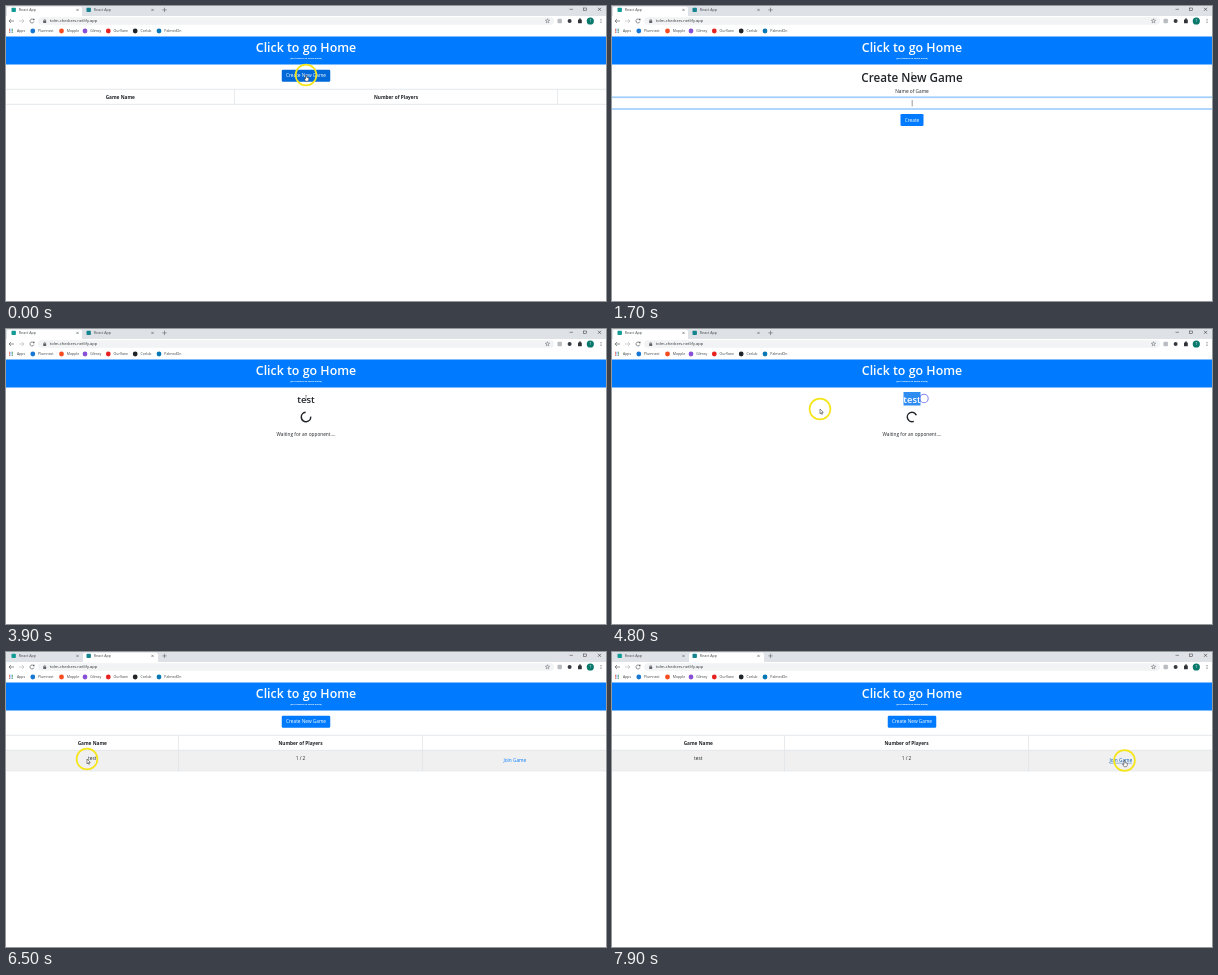
Write an HTML page with a canvas that moves like this. It is 600 px wide and 295 px high and loops after 8 s.

```html
<!DOCTYPE html>
<html lang="en">
<head>
<meta charset="utf-8">
<title>Checkers lobby</title>
<style>
  html, body { margin: 0; width: 100%; height: 100%; overflow: hidden; background: #fff; }
  canvas { display: block; width: 600px; height: 295px; }
</style>
</head>
<body>
<canvas id="stage"></canvas>
<script>
const W = 600, H = 295, LOOP = 8000;
const canvas = document.getElementById('stage');
const ctx = canvas.getContext('2d');
const dpr = window.devicePixelRatio || 1;
canvas.width = W * dpr;
canvas.height = H * dpr;

const BLUE = '#007bff', INK = '#212529', RULE = '#dee2e6', GREY = '#5f6368';
const BODY = 4.75;

// Moments at which the view changes
const FORM = 750, WAIT = 2600, SELECT = 4480, SWITCH = 5560;
const CLICKS = [[500, 300, 69], [4460, 312, 69.5], [5540, 92, 4.5]];
const PATH = [
  [0, 300, 69], [4300, 300, 69], [4440, 312, 69], [4540, 312, 69],
  [4800, 208, 80], [5150, 100, 10], [5350, 92, 5], [5600, 92, 5],
  [5900, 165, 28], [6150, 122, 78], [6500, 81, 107], [6900, 96, 108],
  [7200, 304, 112], [7700, 512, 110], [7900, 512.5, 108.5], [8000, 512.5, 108.5]
];

function rect(x, y, w, h, fill, r = 0) {
  ctx.fillStyle = fill;
  ctx.beginPath();
  ctx.roundRect(x, y, w, h, r);
  ctx.fill();
}

function disc(x, y, r, fill) {
  ctx.fillStyle = fill;
  ctx.beginPath();
  ctx.arc(x, y, r, 0, Math.PI * 2);
  ctx.fill();
}

function ring(x, y, r, color, width) {
  ctx.strokeStyle = color;
  ctx.lineWidth = width;
  ctx.beginPath();
  ctx.arc(x, y, r, 0, Math.PI * 2);
  ctx.stroke();
}

function line(points, color, width = 0.6) {
  ctx.strokeStyle = color;
  ctx.lineWidth = width;
  ctx.beginPath();
  points.forEach(([x, y]) => ctx.lineTo(x, y));
  ctx.stroke();
}

// y is the middle of the capitals
function text(str, x, y, size = BODY, color = INK, weight = 400, align = 'center') {
  ctx.font = `${weight} ${size}px "Open Sans", "Noto Sans", sans-serif`;
  ctx.textAlign = align;
  ctx.fillStyle = color;
  ctx.fillText(str, x, y + size * 0.357);
}

function cross(x, y, r, color) {
  line([[x - r, y - r], [x + r, y + r]], color);
  line([[x - r, y + r], [x + r, y - r]], color);
}

function pointerAt(t) {
  const i = PATH.findIndex((p, k) => k > 0 && t <= p[0]);
  const [t0, x0, y0] = PATH[i - 1], [t1, x1, y1] = PATH[i];
  const u = (t - t0) / (t1 - t0), e = u * u * (3 - 2 * u);
  return { x: x0 + (x1 - x0) * e, y: y0 + (y1 - y0) * e };
}

function drawTab(x, w, active) {
  if (active) rect(x, 0.8, w, 10, '#fff', [2, 2, 0, 0]);
  const left = x < 10 ? 5.5 : 80.5;
  rect(left, 1.7, 4.4, 4.4, x < 10 ? '#129b94' : '#16848f', 0.8);
  text('React App', left + 7.3, 3.9, 3.7, '#45494d', 400, 'left');
  cross(left + 66, 3.9, 1.1, GREY);
}

function drawBrowser(second) {
  rect(0, 0, W, 10, '#dee1e6');
  drawTab(1, 75, !second);
  drawTab(77, 75, second);
  line([[156.3, 3.9], [160.7, 3.9]], GREY);
  line([[158.5, 1.7], [158.5, 6.1]], GREY);
  line([[563.5, 3.3], [567, 3.3]], '#333', 0.5);
  ctx.strokeRect(577.6, 2, 2.7, 2.7);
  cross(593.5, 3.3, 1.5, '#333');

  rect(0, 10, W, 20.5, '#fff');
  line([[8, 15], [3, 15]], GREY, 0.7);
  line([[5, 13], [3, 15], [5, 17]], GREY, 0.7);
  line([[13, 15], [18, 15]], '#b9bcc0', 0.7);
  line([[16, 13], [18, 15], [16, 17]], '#b9bcc0', 0.7);
  ctx.strokeStyle = GREY;
  ctx.beginPath();
  ctx.arc(26, 15, 2, 0.3, 5.5);
  ctx.stroke();
  rect(27, 12.7, 1.5, 1.5, GREY);

  rect(32, 11.3, 516, 7.4, '#f1f3f4', 3.7);
  rect(37.2, 14.5, 3, 2.4, GREY, 0.3);
  ring(38.7, 14.3, 0.9, GREY, 0.5);
  text('tolm-checkers.netlify.app', 43.8, 15, 4.05, '#303438', 400, 'left');
  const star = Array.from({ length: 11 }, (_, i) => {
    const a = i * Math.PI / 5 - Math.PI / 2, r = i % 2 ? 1 : 2.3;
    return [541.5 + r * Math.cos(a), 15 + r * Math.sin(a)];
  });
  line(star, GREY, 0.5);
  rect(551.5, 12.8, 4.4, 4.4, '#b8bcc0', 0.8);
  disc(563.6, 15, 2, '#343a40');
  rect(572, 13.4, 3.8, 3.8, '#303438', 0.5);
  disc(574, 13.2, 0.9, '#303438');
  disc(584.3, 15, 3.6, '#08796b');
  text('T', 584.3, 15, 3.2, '#fff');
  [-1.5, 0, 1.5].forEach(d => disc(595, 15 + d, 0.5, GREY));

  for (let i = 0; i < 9; i++)
    rect(3 + i % 3 * 1.5, 22.8 + Math.floor(i / 3) * 1.5, 1, 1, ['#e15545', '#4d88e8', '#40a35a'][i % 3]);
  text('Apps', 11, 25, 3.5, '#3c4043', 400, 'left');
  const bookmarks = [
    [26.8, 'Plumnest', '#1877d2'], [55.5, 'Mopple', '#f64c22'], [79, 'Glimsy', '#8851d5'],
    [102.3, 'OurVane', '#e62222'], [129.2, 'Corlub', '#20252a'], [153, 'PalmedOn', '#0878b5']
  ];
  bookmarks.forEach(([x, name, color]) => {
    disc(x, 25, 2.4, color);
    text(name, x + 5.3, 25, 3.5, '#3c4043', 400, 'left');
  });
}

function drawBanner(hover) {
  const color = hover ? '#ffa51f' : '#fff';
  rect(0, 30.5, W, 28, BLUE);
  text('Click to go Home', 300, 41.5, 12.4, color, 600);
  text('(best viewed on 600px width)', 300, 52.2, 2.2, color, 700);
}

function drawButton(label, y, w, hover) {
  rect(300 - w / 2, y, w, 12, hover ? '#0069d9' : BLUE, 1.3);
  text(label, 300, y + 6, BODY, '#fff');
}

function drawLobby(hasGame, overButton, overLink) {
  drawButton('Create New Game', 63.7, 48.5, overButton);
  const cols = hasGame ? [172.5, 416.5] : [228.5, 551.5];
  const mid = (cols[0] + cols[1]) / 2;
  if (hasGame) rect(0, 98.5, W, 20.5, '#f0f0f0');
  [83.3, 98.3].forEach(y => line([[0, y], [W, y]], RULE, 0.8));
  cols.forEach(x => line([[x, 83], [x, hasGame ? 119 : 98]], RULE, 0.7));
  text('Game Name', cols[0] / 2, 91, BODY, INK, 700);
  text('Number of Players', mid, 91, BODY, INK, 700);
  if (!hasGame) return;
  line([[0, 119], [W, 119]], RULE, 0.6);
  text('test', cols[0] / 2, 106.5);
  text('1 / 2', mid, 106.5);
  const color = overLink ? '#0056b3' : BLUE;
  text('Join Game', 508.8, 108.7, BODY, color);
  if (overLink) line([[497.5, 111.2], [520, 111.2]], color, 0.4);
}

function drawForm(t) {
  text('Create New Game', 300, 72, 11.7, INK, 600);
  text('Name of Game', 300, 85);
  [91.2, 103].forEach(y => {
    line([[0, y], [W, y]], '#d3e7ff', 2);
    line([[0, y], [W, y]], '#7dbbfa', 0.8);
  });
  const typed = 'test'.slice(0, Math.max(0, Math.floor((t - 1800) / 100)));
  text(typed, 300, 97, BODY, '#495057');
  const half = ctx.measureText(typed).width / 2;
  if (typed || t % 1060 > 530) line([[300.2 + half, 94], [300.2 + half, 100.4]], '#555', 0.6);
  drawButton('Create', 108, 23, false);
}

function drawWaiting(t) {
  const selected = t >= SELECT;
  if (selected) rect(291.5, 63, 17, 13.5, '#2f8cf0');
  text('test', 300, 70.3, 9.4, selected ? '#fff' : INK, 600);
  const gap = (190 / 360 + (t - 2900) / 750) * Math.PI * 2;
  ctx.strokeStyle = INK;
  ctx.lineWidth = 1.5;
  ctx.beginPath();
  ctx.arc(300, 88, 4.7, gap + Math.PI / 4, gap + Math.PI * 7 / 4);
  ctx.stroke();
  text('Waiting for an opponent....', 300, 105);
}

function outline(points) {
  ctx.beginPath();
  points.forEach(([x, y]) => ctx.lineTo(x, y));
  ctx.closePath();
  ctx.fillStyle = '#fff';
  ctx.fill();
  ctx.strokeStyle = '#222';
  ctx.lineWidth = 0.5;
  ctx.stroke();
}

function drawPointer({ x, y }, kind) {
  ctx.save();
  ctx.translate(x, y);
  if (kind === 'beam') {
    line([[0, -2.5], [0, 2.5]], '#444', 0.5);
    [-2.5, 2.5].forEach(d => line([[-0.9, d], [0.9, d]], '#444', 0.4));
  } else if (kind === 'hand') {
    outline([[-0.5, 0.2], [0.5, 0.2], [0.6, 2.2], [2.9, 2.9], [2.7, 5], [2, 6.2], [-0.4, 6.2], [-2, 3.6], [-0.5, 4]]);
  } else {
    outline([[0, 0], [0, 4.8], [1.1, 3.8], [1.8, 5.4], [2.5, 5.1], [1.8, 3.5], [3.3, 3.4]]);
  }
  ctx.restore();
}

function draw(t) {
  ctx.setTransform(dpr, 0, 0, dpr, 0, 0);
  rect(0, 0, W, H, '#fff');
  const p = pointerAt(t);
  const overButton = t < FORM;
  const overLink = t > SWITCH && p.x > 497 && p.x < 521 && p.y > 104 && p.y < 113;
  const overBanner = p.y > 27 && p.y < 58;

  drawBrowser(t >= SWITCH);
  drawBanner(overBanner);
  if (t < FORM) drawLobby(false, overButton, false);
  else if (t < WAIT) drawForm(t);
  else if (t < SWITCH) drawWaiting(t);
  else drawLobby(true, false, overLink);

  CLICKS.forEach(([start, x, y]) => {
    const age = (t - start) / 600;
    if (age < 0 || age > 1) return;
    ctx.globalAlpha = Math.min(1, 1.6 * (1 - age));
    ring(x, y, 4.2, '#5352ea', 1.1);
    ctx.globalAlpha = 1;
  });

  if (t < 1200 || t >= 4300) ring(p.x, p.y, 10.4, '#f5e51b', 1.7);
  const beam = t >= FORM && t < 4600;
  drawPointer(p, beam ? 'beam' : overButton || overLink || overBanner ? 'hand' : 'arrow');
}

function tick(now) {
  draw(now % LOOP);
  requestAnimationFrame(tick);
}
requestAnimationFrame(tick);
</script>
</body>
</html>
```
